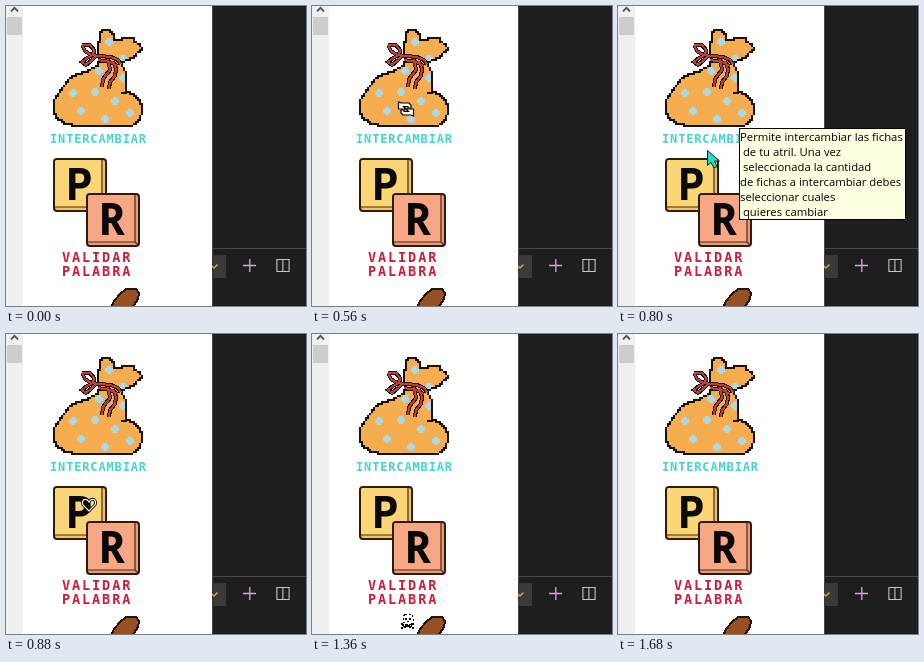
Write an HTML page that moves like this. It is 300 px wide and 300 px high and loops after 1.76 s.

```html
<!DOCTYPE html>
<html lang="es">
<head>
<meta charset="utf-8">
<title>Ayuda de botones</title>
<style>
  html, body { margin: 0; width: 100%; height: 100%; overflow: hidden; background: #fff; }
  #stage { position: relative; width: 300px; height: 300px; overflow: hidden; }
  svg { position: absolute; inset: 0; }
  .crisp { shape-rendering: crispEdges; }
  .label { font: bold 12px "DejaVu Sans Mono", monospace; }
  .letter { font: bold 45px "Noto Sans Mono", monospace; text-anchor: middle; fill: #0b0908; }
  .tip {
    position: absolute; box-sizing: border-box; visibility: hidden;
    background: #ffffe1; border: 1px solid #000; color: #000;
    font: 11.3px/15px "Open Sans", sans-serif; white-space: pre;
  }
  #tip1 { left: 121px; top: 122px; width: 167px; height: 92px; }
  #tip2 { left: 86px; top: 130px; width: 174px; height: 47px; }
  .cursor { visibility: hidden; }
</style>
</head>
<body>
<div id="stage">
  <svg width="300" height="300" viewBox="0 0 300 300">
    <defs>
      <path id="bow" d="M76 39 84 39 88 44 87 49 81 52 76 56 80 59 86 54 90 50M76 39 79 45 85 49 94 50 105 51 112 54 115 58M92 54 104 56 112 60M102 53 104 64 97 73 96 81M107 55 110 63 109 70 104 76 103 83"/>
      <path id="heartLine" d="M0 6-6 0Q-7.500-3.500-5-5.500-2-6.500 0-3 2-6.500 5-5.500 7.500-3.500 6 0Z"/>
      <path id="turn" d="M-7.500-7V0H0L-2.500-2.500H2V-1H5V-4L3-6H-5Z"/>
    </defs>

    <!-- scrollbar -->
    <rect width="17" height="300" fill="#f0f0f0"/>
    <rect x="1" y="11" width="15" height="18" fill="#cdcdcd"/>
    <path d="M5 5.300 8.500 1.800 12 5.300" fill="none" stroke="#505050" stroke-width="1.800"/>

    <!-- editor -->
    <g class="crisp">
      <rect x="206" width="94" height="300" fill="#1e1e1e"/>
      <rect x="206" width="1" height="300" fill="#4a4a4a"/>
      <rect x="206" y="242" width="94" height="1" fill="#4a4a4a"/>
      <rect x="206" y="249" width="14" height="23" fill="#3a3a3a"/>
    </g>
    <g fill="none">
      <path d="M237 259.500h13M243.800 253v13" stroke="#dca6dc" stroke-width="1.300"/>
      <path d="M270.900 253.500h12.200v12h-12.200zM276.900 253v13" stroke="#c5c5c5" stroke-width="1.100"/>
      <path d="M206 260l2 2 3.500-3.500" stroke="#d0a95a" stroke-width="1.400"/>
    </g>

    <!-- bag -->
    <g class="crisp">
      <path id="bag" fill="#f5ad50" d="M94 27 97 24H103L107 28 109 34 113 35 118 31H127L129 36 134 39 136 43 131 47 127 52 121 54 115 57 118 63 120 68V86L127 88 133 94 135 98 136 106 133 114 127 119 118 120H72L60 118 51 112 47 105 48 95 52 88 58 80 63 73 70 69 82 65 92 59 94 52 92 46Z"/>
      <path id="dots" fill="#add8e6"/>
      <path id="bagLine" fill="#17110d"/>
      <path d="M115 87h6" stroke="#17110d" stroke-width="2"/>
      <g fill="none">
        <use href="#bow" stroke="#1c0d0b" stroke-width="4"/>
        <use href="#bow" stroke="#b8433a" stroke-width="2"/>
      </g>
    </g>
    <text class="label" x="44" y="137" fill="#42d5cf" letter-spacing=".85">INTERCAMBIAR</text>

    <!-- tiles -->
    <g id="tiles"></g>
    <g class="label" fill="#c4213c" style="font-size:13.5px" letter-spacing="1.900">
      <text x="56" y="256">VALIDAR</text>
      <text x="56" y="270">PALABRA</text>
    </g>

    <!-- handle -->
    <path class="crisp" d="M105 302 108 295 114 288 120 283H130L133 287 132 293 126 302Z" fill="#975022" stroke="#22130b" stroke-width="2"/>
  </svg>

  <div class="tip" id="tip1">Permite intercambiar las fichas
 de tu atril. Una vez
 seleccionada la cantidad
de fichas a intercambiar debes
seleccionar cuales
 quieres cambiar</div>
  <div class="tip" id="tip2">Verifica si la palabra ingresada es
correcta. Luego de eso pasa al
 turno de la computadora</div>

  <svg width="300" height="300" viewBox="0 0 300 300">
    <g class="cursor" id="arrow">
      <path d="M-5.500-7.500V7.500L-2 4.500 1 10 4 8.500 1.500 3H6.500Z" fill="#27d9cb" stroke="#102020"/>
    </g>
    <g class="cursor" id="swap" fill="#fff" stroke="#000" stroke-width="1.200">
      <use href="#turn"/>
      <use href="#turn" transform="rotate(180)"/>
    </g>
    <g class="cursor" id="heart" fill="none">
      <use href="#heartLine" stroke="#000" stroke-width="2.800"/>
      <use href="#heartLine" stroke="#fff" stroke-width="1.200"/>
    </g>
    <g class="cursor crisp" id="pirate">
      <path d="M-7 3 6 7M6 3-7 7" stroke="#000" stroke-width="2" stroke-dasharray="3 1"/>
      <path d="M-3-7H3L5-4V0L3 3H-3L-5 0V-4Z" fill="#fff" stroke="#000" stroke-dasharray="2 2"/>
      <path d="M-3-3h2v2h-2zM1-3h2v2h-2zM-1 0h2v1h-2z" fill="#000"/>
    </g>
  </svg>
</div>

<script>
const $ = id => document.getElementById(id);
const STEP = 80, LOOP = 1760;

// Trace an outline with 2px blocks
function pixelate(shape) {
  const cells = new Set(), len = shape.getTotalLength();
  for (let s = 0; s < len; s++) {
    const p = shape.getPointAtLength(s);
    cells.add(`M${Math.round(p.x / 2) * 2 - 1} ${Math.round(p.y / 2) * 2 - 1}h2v2h-2z`);
  }
  return [...cells].join('');
}
$('bagLine').setAttribute('d', pixelate($('bag')));

const dots = [[103, 36], [117, 53], [117, 72], [93, 65], [89, 86], [67, 87], [109, 95], [75, 105], [124, 107], [99, 113]];
$('dots').setAttribute('d', dots.map(([x, y]) =>
  `M${x - 2} ${y - 4}h4v2h2v4h-2v2h-4v-2h-2v-4h2z`).join(''));

const tile = (x, y, face, edge, letter) => `
  <g transform="translate(${x} ${y})">
    <rect x="1" y="1" width="52" height="52" rx="3" fill="${edge}" stroke="#2e1a0e" stroke-width="2"/>
    <rect x="2" y="2" width="47" height="47" rx="2" fill="${face}"/>
    <path d="M49 2V49H2M49 49l3 3" fill="none" stroke="#4a2a16" stroke-width="1.200"/>
    <text class="letter" x="26" y="42">${letter}</text>
  </g>`;
$('tiles').innerHTML =
  tile(47, 152, '#fad677', '#efc465', 'P') + tile(80, 187, '#f6a783', '#ee9a74', 'R');

// One row per step from 160 ms: cursor, x, y, tooltip
const START = 2;
const track = [
  ['arrow', 160, 240], ['arrow', 127, 160], ['swap', 113, 128],
  ['swap', 104, 114], ['swap', 97, 106], ['swap', 94, 103],
  ['swap', 94, 104, 'tip1'], ['swap', 94, 122, 'tip1'], ['arrow', 95, 152, 'tip1'],
  ['heart', 83, 171], ['heart', 80, 190], ['heart', 78, 205, 'tip2'],
  ['heart', 77, 213, 'tip2'], ['heart', 80, 237, 'tip2'], ['arrow', 89, 264],
  ['pirate', 96, 287], ['pirate', 97, 289], ['pirate', 98, 296]
];
const parts = document.querySelectorAll('.cursor, .tip');
const t0 = performance.now();

function draw() {
  const step = Math.floor((performance.now() - t0) % LOOP / STEP);
  const [name, x, y, tip] = track[step - START] || [];
  for (const el of parts)
    el.style.visibility = el.id === name || el.id === tip ? 'visible' : 'hidden';
  if (name) $(name).setAttribute('transform', `translate(${x} ${y})`);
  requestAnimationFrame(draw);
}
draw();
</script>
</body>
</html>
```
